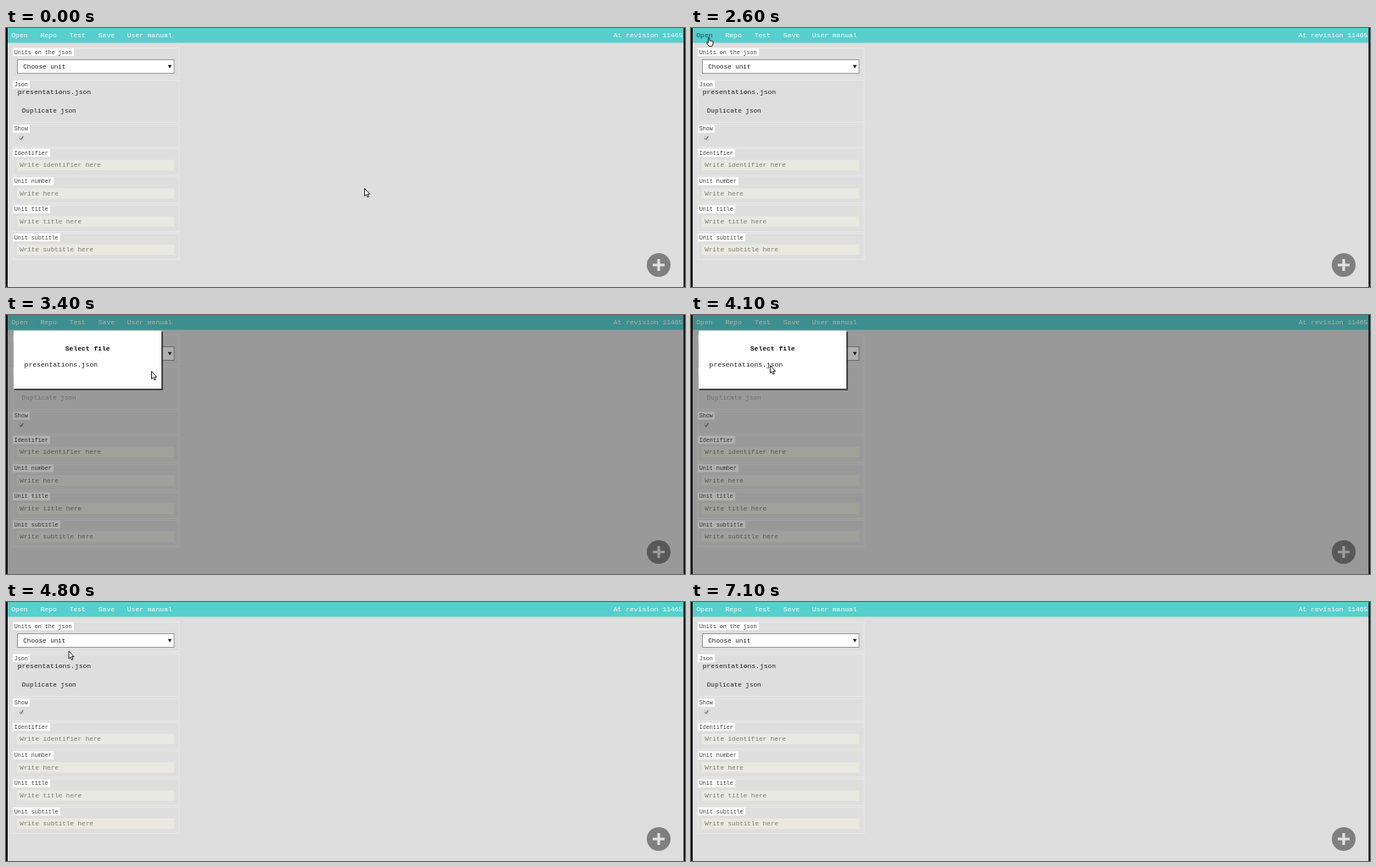
Recreate the animation shown at these times as an HTML page. Size 800 by 306 pixels, loop 7.2 s.

```html
<!DOCTYPE html>
<html lang="en">
<head>
<meta charset="utf-8">
<title>Unit editor</title>
<style>
html, body { margin: 0; width: 100%; height: 100%; overflow: hidden; background: #dedede; }
svg { display: block; width: 800px; height: 306px; }
text { font: 8px "Liberation Mono", monospace; white-space: pre; fill: #222; }
.menu { fill: #fff; }
.menu.hover { fill: #245; }
.label { font-size: 6.67px; fill: #444; }
.field { font-size: 7.6px; }
.hint { font-size: 7.6px; fill: #7c7c78; }
.set { fill: none; stroke: #e8e8e8; }
.bold { font-weight: bold; fill: #111; }
.pointer { fill: #fff; stroke: #111; stroke-width: .9; stroke-linejoin: round; }
</style>
</head>
<body>
<svg id="stage" viewBox="0 0 800 306">
  <rect width="800" height="306" fill="#dedede"/>
  <rect width="800" height="17.5" fill="#57cfcc"/>
  <g id="form"></g>
  <circle cx="769" cy="280" r="14" fill="#7f7f7f"/>
  <path d="M762 280h14M769 273v14" stroke="#e2e2e2" stroke-width="3.2"/>
  <rect id="shade" width="800" height="306" opacity=".31"/>
  <g id="dialog">
    <rect x="10" y="20" width="175" height="69" fill="#333" opacity=".8"/>
    <rect x="9" y="18.5" width="174" height="68.5" fill="#fff"/>
    <text class="bold" x="69.8" y="42.3">Select file</text>
    <text x="21.6" y="61.3">presentations.json</text>
  </g>
  <path d="M0 0h2v306h-2zM798.3 0h1.7v306h-1.7z" fill="#111"/>
  <path id="arrow" class="pointer" d="M.5 .5v9l2-1.8 1.5 3.2 1.5-.7-1.5-3.1h2.6z"/>
  <path id="hand" class="pointer" d="M1.8 1.3q.9-.7 1.5.3v3.2l3.4.7q1 .3.9 1.4l-.5 3-.8 1.6h-3.6l-2.6-3.6q-.4-1.2.7-1l1 .9z"/>
</svg>
<script>
const LOOP = 7200, STEP = 100;
const $ = id => document.getElementById(id);

const label = (s, x, y, cls = "") => `<text class="${cls}" x="${x}" y="${y}">${s}</text>`;
const box = (x, y, w, h, fill) => `<rect x="${x}" y="${y}" width="${w}" height="${h}" fill="${fill}"/>`;

// Fieldsets: legend, top, bottom, placeholder
const sets = [
  ["Units on the json", 23.5, 58.5],
  ["Json", 61.5, 111.5],
  ["Show", 114, 140.5],
  ["Identifier", 142.5, 174, "Write identifier here"],
  ["Unit number", 176, 207, "Write here"],
  ["Unit title", 209.3, 240.5, "Write title here"],
  ["Unit subtitle", 242.5, 273.5, "Write subtitle here"]
];
const menu = [["Open", 6.3], ["Repo", 40.5], ["Test", 74.7], ["Save", 108.8], ["User manual", 142.8], ["At revision 11465", 715.8]];

$("form").innerHTML =
  menu.map(([s, x]) => label(s, x, 11.2, "menu")).join("") +
  sets.map(([name, top, end, hint]) =>
    `<rect class="set" x="8" y="${top}" width="196" height="${end - top}"/>` +
    box(8, top + .3, name.length * 4 + 4, 9.4, "#fff") +
    label(name, 9.7, top + 7.1, "label") +
    (hint ? box(13, top + 13.2, 185, 12.4, "#e9e9e1") + label(hint, 16.2, top + 21.6, "hint") : "")
  ).join("") +
  `<rect x="13.5" y="37.5" width="184.5" height="16" fill="#fff" stroke="#999"/>` +
  label("Choose unit", 20.3, 47.8, "field") +
  `<path d="M190.8 43.7h4.4l-2.2 4z" fill="#111"/>` +
  label("presentations.json", 13.7, 77.6) +
  `<g id="copy">${label("Duplicate json", 18.8, 100.3, "field")}</g>` +
  box(15.5, 127.5, 5.5, 5.5, "#d2d2d2") +
  `<path d="M16.3 130.3l1.4 1.6 2.6-4" fill="none" stroke="#555"/>`;

const open = document.querySelector(".menu");

// Pointer path: time, x, y
const path = [
  [0, 422, 189], [100, 422, 189], [800, 44, 43], [1000, 39, 40], [1600, 39, 40],
  [2300, 18.5, 10], [2700, 18.5, 10], [3100, 486, 184], [3400, 171, 66],
  [3600, 171, 66], [4300, 73.5, 57.5], [LOOP, 73.5, 57.5]
];

function pointerAt(t) {
  const i = path.findIndex(p => p[0] > t);
  const [t0, x0, y0] = path[i - 1], [t1, x1, y1] = path[i];
  const u = (t - t0) / (t1 - t0), k = u * u * (3 - 2 * u);
  return [x0 + (x1 - x0) * k, y0 + (y1 - y0) * k];
}

const show = (id, on) => { $(id).style.display = on ? "" : "none"; };

function draw(now) {
  const t = Math.floor(now % LOOP / STEP) * STEP;
  const within = (a, b) => t >= a && t < b;
  const [x, y] = pointerAt(t);
  const onMenu = within(2200, 2800), hasDialog = within(2800, 4700);
  show("shade", within(2800, 4800));
  show("dialog", hasDialog);
  show("hand", onMenu);
  show("arrow", !onMenu && t < 6000);
  $("copy").style.opacity = hasDialog ? .35 : 1;
  open.classList.toggle("hover", onMenu);
  for (const id of ["arrow", "hand"]) $(id).setAttribute("transform", `translate(${x} ${y})`);
}

const start = performance.now();
function frame() {
  draw(performance.now() - start);
  requestAnimationFrame(frame);
}
frame();
</script>
</body>
</html>
```
